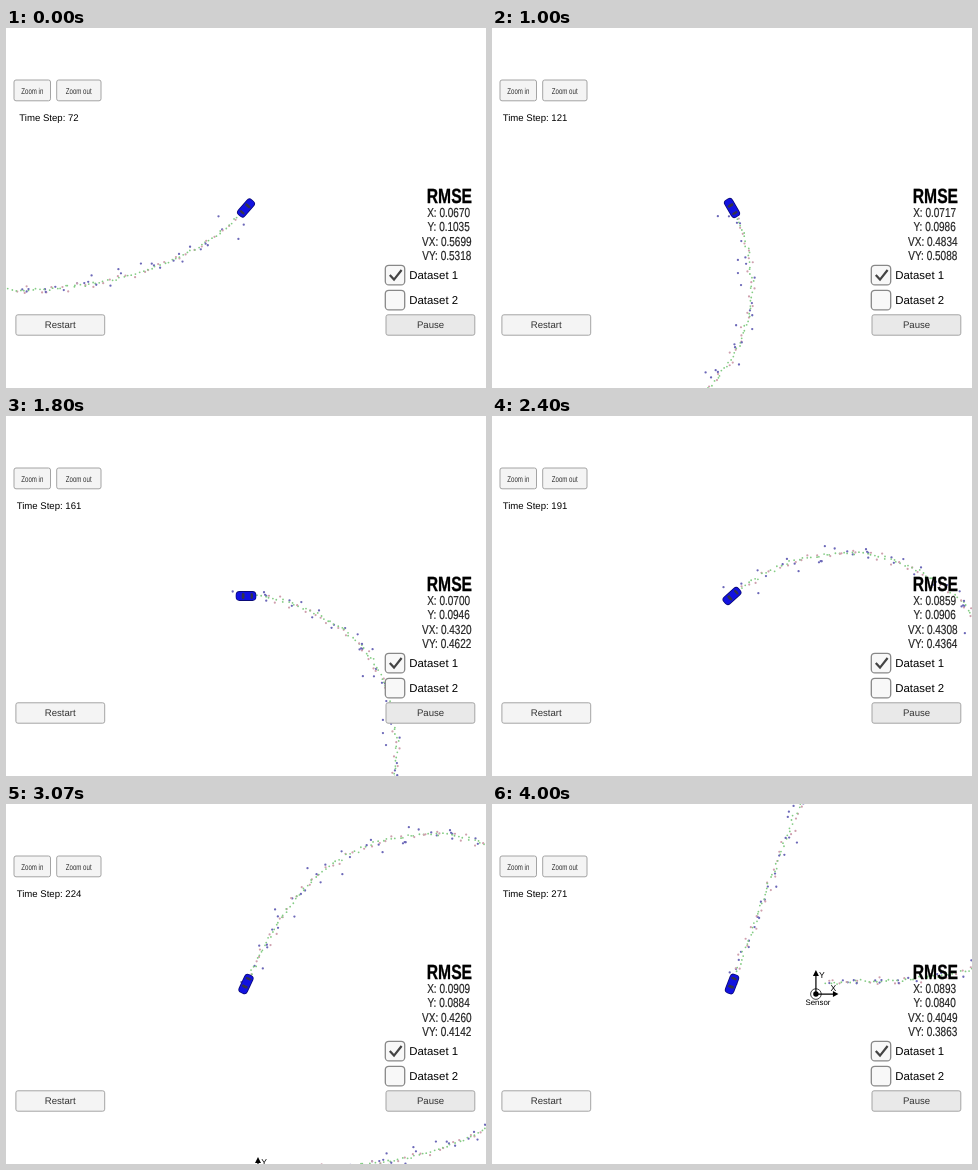
Recreate the animation shown at these times as an HTML page with a canvas. Size 480x360 px, loop 4.07 s.

```html
<!DOCTYPE html>
<html lang="en">
<head>
<meta charset="utf-8">
<title>Tracking simulator</title>
<style>
  html, body { margin: 0; width: 100%; height: 100%; overflow: hidden; background: #fff; }
  canvas, svg { position: absolute; left: 0; top: 0; width: 480px; height: 360px; }
  text { font-family: "Liberation Sans", Arial, sans-serif; text-anchor: middle; text-rendering: geometricPrecision; }
  .btn { stroke: #a4a4a4; fill: #f4f4f4; }
  .box { stroke: #888; stroke-width: 1.3; fill: #f8f8f8; }
  .cap { fill: #323232; font-size: 9.6px; }
  .check { fill: none; stroke: #444; stroke-width: 2.2; }
  .label { font-size: 11.4px; text-anchor: start; }
  .narrow { fill: #323232; font-size: 8.5px; }
  .value { fill: #222; font-size: 13px; stroke: #222; stroke-width: .2; }
  .axis { stroke: #000; stroke-width: 1.2; fill: none; }
</style>
</head>
<body>
<canvas id="trail" width="480" height="360"></canvas>
<svg viewBox="0 0 480 360">
  <g id="sensor">
    <circle r="5.3" class="axis" style="stroke:#444;stroke-width:1"/>
    <circle r="2.7"/>
    <path d="M0 0V-19M0 0H18" class="axis"/>
    <path d="M0 -24L3 -18H-3ZM22.5 0L17 3V-3Z"/>
    <text x="6" y="-16" font-size="8.6">Y</text>
    <text x="17.5" y="-3.2" font-size="8.6">X</text>
    <text x="2" y="11.2" font-size="7.9">Sensor</text>
  </g>
  <g id="car">
    <rect x="-10.3" y="-4.9" width="20.6" height="9.8" rx="3.8" fill="#0a0a78"/>
    <rect x="-9.6" y="-4.1" width="19.2" height="8.2" rx="3.2" fill="#1212e0"/>
    <path d="M-6.5 -3Q-7.6 0 -6.5 3L-4.6 2.4V-2.4ZM1.5 -2.6L3.8 -3.2Q5 0 3.8 3.2L1.5 2.6Z" fill="#34344a"/>
  </g>

  <rect class="btn" x="8" y="52" width="36.5" height="20.8" rx="2"/>
  <rect class="btn" x="50.7" y="52" width="44.3" height="20.8" rx="2"/>
  <text class="narrow" transform="translate(26.3 65.6) scale(.72 1)">Zoom in</text>
  <text class="narrow" transform="translate(72.7 65.6) scale(.72 1)">Zoom out</text>
  <text id="step" x="43" y="93.3" font-size="9.6"></text>

  <rect class="btn" x="9.9" y="286.8" width="88.8" height="20.4" rx="2"/>
  <rect class="btn" x="380" y="286.8" width="88.8" height="20.4" rx="2" style="fill:#e9e9e9"/>
  <text class="cap" x="54.2" y="300.4">Restart</text>
  <text class="cap" x="424.5" y="300.4">Pause</text>

  <rect class="box" x="379.3" y="237.3" width="19.4" height="19.6" rx="3.5"/>
  <rect class="box" x="379.3" y="262.3" width="19.4" height="19.6" rx="3.5"/>
  <path class="check" d="M383.8 247L388 251.6L395.6 242"/>
  <text class="label" x="403.3" y="251">Dataset 1</text>
  <text class="label" x="403.3" y="276">Dataset 2</text>

  <text transform="translate(443.4 174.6) scale(.765 1)" font-size="20.5" font-weight="bold" stroke="#000" stroke-width=".3">RMSE</text>
  <g id="values"></g>
</svg>
<script>
const LOOP = 4070, FRAME = 200 / 3, CX = 240, CY = 180;
const $ = id => document.getElementById(id);
const ctx = $('trail').getContext('2d');

// Bends of the drive: time step, place relative to the sensor, heading in degrees
const bends = [
  [0, 10, -11, -2], [33, 141, -21.5, -11], [72, 283, -95, -49], [97, 324, -182, -87],
  [121, 305, -275, -120], [161, 174, -347, -180], [191, 58, -304, -222],
  [224, -12, -197, -245], [251, -54, -91, -250], [273, -87, -2, -249]
];

// Displayed errors: time step, X, Y, VX, VY
const errors = [
  [72, .0670, .1035, .5699, .5318], [121, .0717, .0986, .4834, .5088],
  [161, .0700, .0946, .4320, .4622], [191, .0859, .0906, .4308, .4364],
  [224, .0909, .0884, .4260, .4142], [251, .0890, .0861, .4157, .3967],
  [271, .0893, .0840, .4049, .3863]
];

// The two keys around a step, and how far it lies between them
function between(keys, s) {
  let i = 0;
  while (i < keys.length - 2 && s >= keys[i + 1][0]) i++;
  const a = keys[i], b = keys[i + 1];
  return [a, b, (s - a[0]) / (b[0] - a[0])];
}

// Hermite curve that leaves and enters each bend along its heading
function locate(s) {
  const [a, b, u] = between(bends, s), v = 1 - u;
  const pull = Math.hypot(b[1] - a[1], b[2] - a[2]) * u * v;
  return [Math.cos, Math.sin].map((part, n) =>
    v * v * (1 + 2 * u) * a[n + 1] + u * u * (3 - 2 * u) * b[n + 1] +
    pull * (v * part(a[3] * Math.PI / 180) - u * part(b[3] * Math.PI / 180)));
}

let seed = 20;
function random() {
  seed = (seed * 1664525 + 1013904223) % 4294967296;
  return (seed + 1) / 4294967297;
}
const gauss = sd => sd * Math.sqrt(-2 * Math.log(random())) * Math.cos(2 * Math.PI * random());

// Each step gives one estimate and, in turn, a lidar or a radar reading
const dots = [];
for (let s = 0; s <= 272; s++) {
  const [x, y] = locate(s);
  if (s % 2) {
    const r = Math.hypot(x, y) + gauss(4.8), a = Math.atan2(y, x) + gauss(.03);
    dots.push({ s, x: r * Math.cos(a), y: r * Math.sin(a), size: 1.15, color: '#6c68b8' });
  } else {
    dots.push({ s, x: x + gauss(2.4), y: y + gauss(2.4), size: 1.1, color: '#cfa0ae' });
  }
  dots.push({ s, x: x + gauss(.9), y: y + gauss(.9), size: .9, color: '#84cc84' });
}

const rows = ['X', 'Y', 'VX', 'VY'].map((name, i) => {
  const node = document.createElementNS('http://www.w3.org/2000/svg', 'text');
  node.setAttribute('class', 'value');
  node.setAttribute('transform', `translate(${i < 2 ? 442.6 : 440.8} ${188.7 + 14.4 * i}) scale(.77 1)`);
  $('values').append(node);
  return { name, node };
});

function draw(time) {
  const k = Math.min(60, Math.floor((time % LOOP + 4) / FRAME));
  const s = Math.floor(72 + 3.32 * k);
  const [x, y] = locate(s), [x0, y0] = locate(s - .5), [x1, y1] = locate(s + .5);
  const ox = CX - x, oy = CY - y;

  ctx.clearRect(0, 0, 480, 360);
  for (const d of dots) {
    if (d.s > s) break;
    ctx.fillStyle = d.color;
    ctx.beginPath();
    ctx.arc(d.x + ox, d.y + oy, d.size, 0, 7);
    ctx.fill();
  }

  const angle = Math.atan2(y1 - y0, x1 - x0) * 180 / Math.PI;
  $('sensor').setAttribute('transform', `translate(${ox} ${oy})`);
  $('car').setAttribute('transform', `translate(${CX} ${CY}) rotate(${angle})`);
  $('step').textContent = 'Time Step: ' + s;

  const [a, b, u] = between(errors, s);
  rows.forEach(({ name, node }, n) => {
    const value = a[n + 1] + u * (b[n + 1] - a[n + 1]);
    node.textContent = `${name}: ${value.toFixed(4)}`;
  });
}

const start = performance.now();
function tick() {
  draw(performance.now() - start);
  requestAnimationFrame(tick);
}
tick();
</script>
</body>
</html>
```
